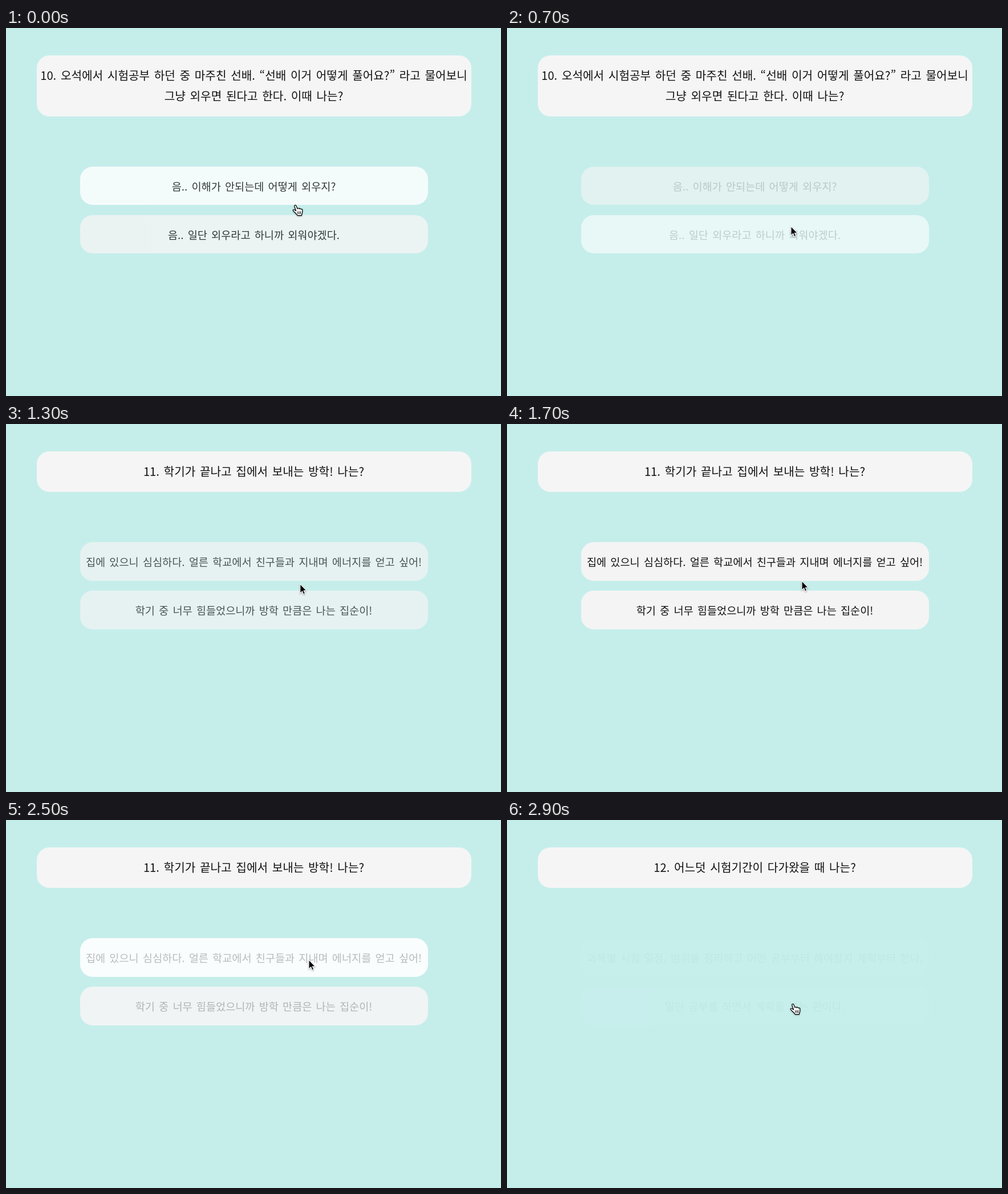
Write an HTML page that moves like this. It is 868 by 645 pixels and loops after 3 s.

```html
<!DOCTYPE html>
<html lang="ko">
<head>
<meta charset="utf-8">
<style>
  html, body { margin: 0; width: 100%; height: 100%; overflow: hidden; background: #c5eeeb; }
  body { font-family: "Noto Sans CJK KR", "Noto Sans CJK", sans-serif; font-weight: 500; color: #111; position: relative; }
  h1, .option {
    position: absolute; margin: 0; box-sizing: border-box; border-radius: 22px;
    background: #f5f5f5; text-align: center; white-space: pre; word-spacing: 2px;
  }
  h1 { left: 53.5px; top: 48px; width: 762px; padding: 16.5px 0 18.5px; font-size: 20.2px; font-weight: 500; line-height: 36px; }
  .option { left: 129.5px; width: 610px; height: 67.5px; font-size: 18.6px; line-height: 67.5px; }
  .option.hover { background: #fff; }
  .disabled .option { color: rgba(16, 16, 16, .3); }
  svg { position: absolute; left: 0; top: 0; overflow: visible; filter: drop-shadow(0 1px 1px rgba(0, 0, 0, .35)); }
</style>
</head>
<body>
<h1></h1>
<div id="options"><div class="option"></div><div class="option"></div></div>
<svg width="24" height="24">
  <path id="arrow" d="M0 0V16.2L3.7 12.8L6 18.2L8.7 17.1L6.4 11.7H11.2Z" stroke="#fff" stroke-width="1.1"/>
  <g id="hand" transform="translate(0 1)" stroke="#000" stroke-width="1.2" stroke-linejoin="round" stroke-linecap="round">
    <path fill="#fff" d="M1.5 9.5L-1 2C-2-.8 1-1.6 2 1L4 6C4.2 4.2 6.8 4.4 7 6.3C7.6 4.6 9.9 5 10.2 7C11 5.7 12.8 6.4 12.8 8L12.6 12C12.4 14 11.6 15 11.3 17.6H4.2C3 14.6-1.5 12-3.6 9C-4.4 7.2-2 6.6-.6 8.2Z"/>
    <path fill="none" stroke-width="1" d="M4.8 10.8v4M7.2 10.8v4M9.5 10.8v4"/>
  </g>
</svg>
<script>
const LOOP = 3000, STEP = 100, FADE_OUT = 400, FADE_IN = 800;
const OPTION_HEIGHT = 67.5, OPTION_PITCH = 85.25;

const pages = [
  { shown: -415, clicked: 600, top: 242.5,
    title: '10. 오석에서 시험공부 하던 중 마주친 선배. “선배 이거 어떻게 풀어요?” 라고 물어보니\n그냥 외우면 된다고 한다. 이때 나는?',
    options: ['음.. 이해가 안되는데 어떻게 외우지?', '음.. 일단 외우라고 하니까 외워야겠다.'] },
  { shown: 975, clicked: 2460, top: 207,
    title: '11. 학기가 끝나고 집에서 보내는 방학! 나는?',
    options: ['집에 있으니 심심하다. 얼른 학교에서 친구들과 지내며 에너지를 얻고 싶어!', '학기 중 너무 힘들었으니까 방학 만큼은 나는 집순이!'] },
  { shown: 2865, clicked: Infinity, top: 207,
    title: '12. 어느덧 시험기간이 다가왔을 때 나는?',
    options: ['과목별 시험 일정, 범위를 정리하고 어떤 공부부터 해야할지 계획부터 한다.', '일단 공부를 하면서 계획을 짜는 편이다.'] },
];

// Pointer path: time, x, y
const pointerPath = [
  [0, 507, 310], [300, 501, 338], [500, 498, 347.5], [700, 498, 347.5], [1100, 515, 284],
  [1600, 517, 275], [2100, 517, 275], [2300, 531, 245], [2500, 531, 245], [2900, 501, 322],
];

const $ = selector => document.querySelector(selector);
const title = $('h1'), group = $('#options'), pointer = $('svg');
const options = [...group.children];

// CSS "ease": cubic-bezier(.25, .1, .25, 1)
function ease(p) {
  if (p <= 0 || p >= 1) return p <= 0 ? 0 : 1;
  const bezier = (u, a, b) => 3 * u * (1 - u) * ((1 - u) * a + u * b) + u ** 3;
  let low = 0, high = 1;
  for (let i = 0; i < 20; i++) {
    const mid = (low + high) / 2;
    if (bezier(mid, .25, .25) < p) low = mid; else high = mid;
  }
  return bezier(low, .1, 1);
}

function pointerAt(t) {
  const next = pointerPath.findIndex(key => key[0] > t);
  if (next < 0) return pointerPath.at(-1).slice(1);
  const [t0, x0, y0] = pointerPath[next - 1], [t1, x1, y1] = pointerPath[next];
  const k = (t - t0) / (t1 - t0);
  return [x0 + (x1 - x0) * k, y0 + (y1 - y0) * k];
}

function render(t) {
  const page = pages.findLast(p => p.shown <= t);
  const disabled = t >= page.clicked;
  const [x, y] = pointerAt(t);
  let hovering = false;

  title.textContent = page.title;
  group.className = disabled ? 'disabled' : '';
  const opacity = disabled
    ? 1 - ease((t - page.clicked) / FADE_OUT)
    : ease((t - page.shown) / FADE_IN);

  options.forEach((option, i) => {
    const top = page.top + i * OPTION_PITCH;
    const hover = y >= top && y <= top + OPTION_HEIGHT;
    hovering ||= hover;
    option.textContent = page.options[i];
    option.style.top = top + 'px';
    option.style.opacity = opacity;
    option.classList.toggle('hover', hover);
  });

  const showHand = hovering && !disabled;
  $('#hand').style.display = showHand ? '' : 'none';
  $('#arrow').style.display = showHand ? 'none' : '';
  pointer.style.transform = `translate(${x}px, ${y}px)`;
}

const start = performance.now();
function tick() {
  const t = (performance.now() - start) % LOOP;
  render(Math.floor(t / STEP) * STEP);
  requestAnimationFrame(tick);
}
tick();
</script>
</body>
</html>
```
